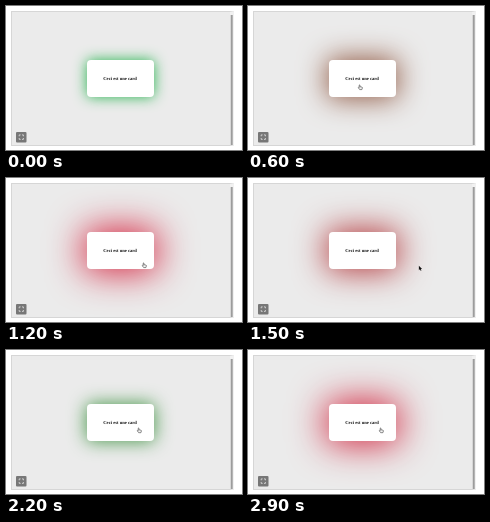
Animation, 236 px wide and 144 px high, one loop 3000 ms. Source, as an HTML page:

```html
<!DOCTYPE html>
<html lang="fr">
<head>
<meta charset="utf-8">
<style>
  html, body { margin: 0; width: 100%; height: 100%; overflow: hidden; background: #fff; }
  #panel { position: absolute; left: 5px; top: 5px; width: 218px; height: 133px;
    background: #ebebeb; border: 1px solid #d6d6d6; border-right: 4px solid #f1f1f1; }
  #card { position: absolute; left: 80.5px; top: 54px; width: 67px; height: 37px;
    border-radius: 4px; background: #fff; }
  svg { position: absolute; left: 0; top: 0; }
  text { font: bold 46px "Liberation Serif", "Times New Roman", serif; fill: #111;
    text-rendering: geometricPrecision; }
</style>
</head>
<body>
<div id="panel"></div>
<div id="card"></div>
<svg width="236" height="144" viewBox="0 0 236 144">
  <rect x="224.7" y="9" width="2" height="130" fill="#9c9c9c"/>
  <rect x="10" y="126" width="10.5" height="10.5" rx="1" fill="#777"/>
  <path d="M13.2 130.3v-1.4h1.4M16 128.9h1.4v1.4M17.4 132v1.4h-1.4M14.6 133.4h-1.4v-1.4"
    fill="none" stroke="#e4e4e4" stroke-width=".8"/>
  <text transform="translate(97.3 74.2) scale(.1)">Ceci est une card</text>
  <path id="arrow" d="M0 0V4.3L1 3.4L1.8 5L2.6 4.6L1.9 3.1H3.2Z" fill="#111"/>
  <path id="hand" d="M1.2 3.2V.7Q1.6 .1 2 .7V2.2L4 2.6Q4.5 2.8 4.4 3.4L3.9 5.1H1.7L.2 3.2Q.4 2.5 1.2 3.2Z"
    fill="#f4f4f4" stroke="#333" stroke-width=".55"/>
</svg>
<script>
const LOOP = 3000, STEP = 100, FADE = 1000;
const ENTER = 250, LEAVE = 1350, RETURN = 2070;
const card = document.getElementById('card');
const arrow = document.getElementById('arrow');
const hand = document.getElementById('hand');

const start = { x: 110, y: 116 };
const moves = [
  { from: 100, to: 350, x: 110, y: 78.5 },
  { from: 600, to: 1150, x: 136, y: 84.5 },
  { from: 1300, to: 1650, x: 193.5, y: 90 },
  { from: 1850, to: 2200, x: 131, y: 77.6 }
];
const mix = (a, b, k) => a + (b - a) * k;
const progress = (t, from, to) => Math.min(1, Math.max(0, (t - from) / (to - from)));
const smooth = k => k * k * (3 - 2 * k);

// CSS "ease": cubic-bezier(.25, .1, .25, 1)
function ease(x) {
  const bezier = (a, b, s) => 3 * a * s * (1 - s) ** 2 + 3 * b * s * s * (1 - s) + s ** 3;
  let low = 0, high = 1;
  for (let i = 0; i < 20; i++) {
    const mid = (low + high) / 2;
    if (bezier(.25, .25, mid) < x) low = mid; else high = mid;
  }
  return bezier(.1, 1, low);
}
const fade = (t, from) => ease(progress(t, from, from + FADE));

function glow(t) {
  if (t < LEAVE) return fade(t, ENTER);
  const rest = 1 - fade(Math.min(t, RETURN), LEAVE);
  return mix(rest, 1, fade(t, RETURN));
}

function pointerAt(t) {
  let { x, y } = start;
  for (const move of moves) {
    const k = smooth(progress(t, move.from, move.to));
    x = mix(x, move.x, k);
    y = mix(y, move.y, k);
  }
  return [x, y];
}

function draw() {
  const t = Math.floor(performance.now() % LOOP / STEP) * STEP;
  const k = glow(t);
  const rgb = [mix(40, 212, k), mix(180, 30, k), mix(80, 58, k)].map(Math.round);
  card.style.boxShadow = `0 0 ${mix(14, 36, k)}px ${mix(0, 3, k)}px rgb(${rgb})`;

  const visible = t >= moves[0].from;
  const over = t >= ENTER && t < LEAVE || t >= RETURN;
  arrow.style.display = visible && !over ? '' : 'none';
  hand.style.display = visible && over ? '' : 'none';
  (over ? hand : arrow).setAttribute('transform', `translate(${pointerAt(t)})`);
  requestAnimationFrame(draw);
}
draw();
</script>
</body>
</html>
```
